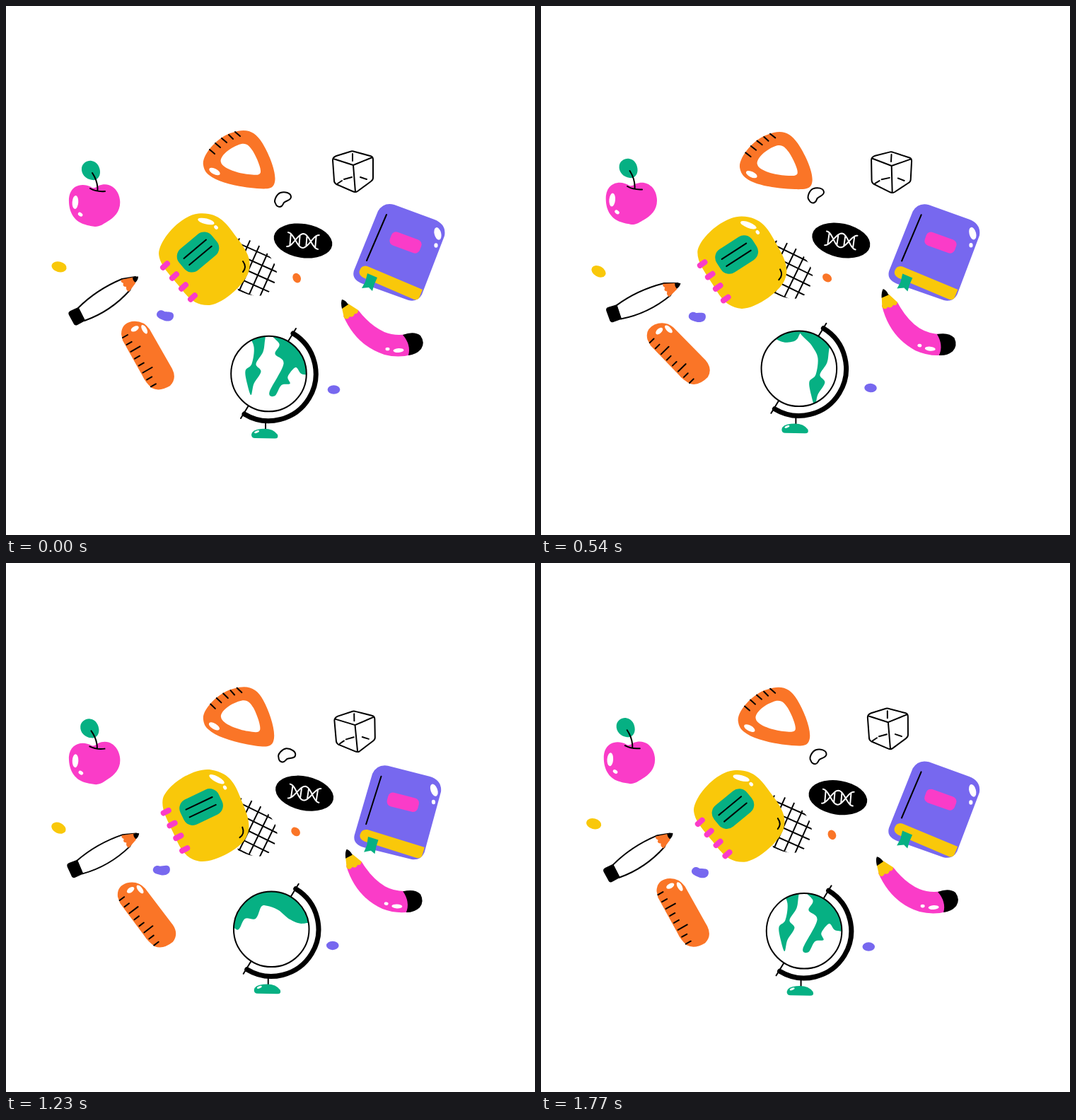
These frames come from a looping animation (748x748 px, 1800 ms). An HTML page:

```html
<!DOCTYPE html>
<html lang="en">
<head>
<meta charset="utf-8">
<title>School things</title>
<style>
  html, body { margin: 0; width: 100%; height: 100%; overflow: hidden; background: #fff; }
  svg { display: block; width: 100%; height: 100%; }
  .pink { fill: #fa3cc8; }
  .green { fill: #06b083; }
  .orange { fill: #fa7527; }
  .yellow { fill: #f9c80a; }
  .purple { fill: #7768ef; }
  .white { fill: #fff; }
  .line { fill: none; stroke: #000; stroke-width: 2; stroke-linecap: round; stroke-linejoin: round; }
</style>
</head>
<body>
<!-- data-sway: size@phase of the swing in x, y and turn; data-pivot: centre of the turn -->
<svg viewBox="0 0 748 748">
  <defs>
    <clipPath id="ball"><circle cx="371.5" cy="520" r="53"/></clipPath>
    <clipPath id="patch"><path d="M318 328L340 329Q362 338 373 354Q386 370 382 384Q378 402 366 409Q346 412 328 402Z"/></clipPath>
  </defs>

  <g data-pivot="125,282" data-sway="1.7@128 2.3@-75 1.8@76">
    <path class="green" d="M122 246C113 245 106 238 107 229C108 222 115 218 121 219C129 220 133 228 133 235C133 242 128 247 122 246Z"/>
    <path class="pink" d="M122 257C110 249 91 252 89 272C88 292 97 305 112 309C118 311 121 311 126 312C133 312 138 308 143 305C154 299 163 289 161 274C159 258 146 248 131 254C128 256 125 258 122 257Z"/>
    <path class="line" d="M119 258Q128 263 140 262M122 236Q130 248 129.5 261"/>
    <ellipse class="white" cx="98" cy="277.5" rx="4.3" ry="9.5" transform="rotate(4 98 277)"/>
    <ellipse class="white" cx="105.5" cy="294.5" rx="3.6" ry="2.5" transform="rotate(35 105 294)"/>
  </g>

  <g data-pivot="330,217" data-sway="1.2@133 1.9@104 3.3@-95">
    <path class="orange" d="M279 225C276 211 300 184 320 179C340 172 352 177 362 193C372 209 383 236 380 249C378 259 370 259 355 258C330 256 300 250 287 239C282 235 280 231 279 225Z"/>
    <path class="white" d="M304 221C301 213 317 199 333 195C341 194 344 198 349 205C355 215 361 230 360 235C359 240 352 239 343 238C330 237 306 230 304 221Z"/>
    <path class="line" d="M288 203L295 209M296 194L303 200M305 187L312 193M315 182L321 188M324 178L331 184"/>
    <ellipse class="white" cx="295" cy="234" rx="8.5" ry="4" transform="rotate(28 295 234)"/>
  </g>

  <g data-pivot="491,234" data-sway="2.7@159 2.5@-140 2.3@108">
    <path class="line" d="M467 212L488 205.5Q490 205 493 206L515 212Q519 213 519 217L519 243Q519 246 516 248L497 262Q494 264 490 262L467 252Q464 250 464 247L462 218Q462 214 467 212ZM463 216L491 225L518 214M491 225L494 263M490 209V219M469 251L475 247M478 245L489 242M501 242L510 245"/>
  </g>

  <g data-pivot="391.5,274" data-sway="4.4@-104 3.7@-47 12@-112">
    <path class="line" d="M381 279C378 275 383 266 388 264C394 262 403 264 403 270C403 275 396 275 393 278C391 281 391 284 387 284C384 284 382 282 381 279Z"/>
  </g>

  <g data-pivot="420,332" data-sway="2.7@150 3.9@49 2.4@180">
    <ellipse cx="420" cy="332" rx="41.7" ry="24" transform="rotate(9 420 332)"/>
    <path id="helix" fill="none" stroke="#fff" stroke-width="2" stroke-linecap="round" transform="translate(420 332) rotate(5)"/>
  </g>

  <g data-pivot="555,349" data-sway="1.4@55 3@-128 3.6@50">
    <path class="purple" d="M526 290Q534 277 549 281L606 302Q623 309 620 325L588 408Q582 419 569 416L505 393Q488 387 492 374Z"/>
    <path class="yellow" d="M511 368L589 401L584 413Q582 416 577 415L505 384Q498 380 500 374Q503 366 511 368Z"/>
    <path class="green" d="M511 378L525 384L521 393L518 403L513 398L503 399L508 390Z"/>
    <rect class="pink" x="542.5" y="324.5" width="45" height="20" rx="7" transform="rotate(20 565 334.5)"/>
    <path class="line" d="M538 295L510 360"/>
    <ellipse class="white" cx="610.5" cy="322" rx="4.8" ry="9" transform="rotate(-14 610 322)"/>
    <ellipse class="white" cx="608" cy="338.5" rx="2.6" ry="3.2"/>
  </g>

  <g data-pivot="350,370" data-sway="1@160 3.2@-175 1.5@180">
    <g clip-path="url(#patch)"><path id="grid" class="line" transform="translate(352 370) rotate(24)"/></g>
  </g>

  <g data-pivot="280.5,358" data-sway="2.4@149 3.3@112 8.8@-156">
    <path class="yellow" d="M216 350C217 330 247 296 272 293.5C300 291 311 306 326 327C340 345 347 358 344 372C342 390 308 421 288 423C265 424 255 409 243 394C228 376 217 365 216 350Z"/>
    <g transform="translate(271.5 348) rotate(-40)">
      <rect class="green" x="-30" y="-19.5" width="60" height="39" rx="14"/>
      <path class="line" d="M-21 -6H20M-21 6H20"/>
    </g>
    <g id="rings" class="pink"></g>
    <ellipse class="white" cx="283" cy="304.5" rx="12" ry="4" transform="rotate(14 283 304)"/>
    <ellipse class="white" cx="297" cy="313" rx="3.2" ry="2.4" transform="rotate(45 297 313)"/>
    <path class="line" d="M335 361Q341 369 335 376"/>
  </g>

  <g data-pivot="75,369" data-sway="4.4@118 4.6@173 10@165">
    <ellipse class="yellow" cx="75" cy="368.8" rx="10.8" ry="7.4" transform="rotate(14 75 369)"/>
  </g>
  <g data-pivot="225.5,438" data-sway="3.4@6 3@76 7@20">
    <path class="purple" d="M213 436C214 430 220 429 224 432C229 433 238 431 237 439C236 446 228 447 222 444C217 442 213 440 213 436Z"/>
  </g>
  <g data-pivot="411,385" data-sway="4@-45 2.9@51 18@-17">
    <ellipse class="orange" cx="411.3" cy="384.7" rx="5.6" ry="7" transform="rotate(-25 411 385)"/>
  </g>
  <g data-pivot="463.5,542.5" data-sway="2.3@97 1.6@-22 2@120">
    <ellipse class="purple" cx="463.5" cy="542.5" rx="8.8" ry="6.2"/>
  </g>

  <g data-pivot="137.5,417" data-sway="4.1@115 3@75 5.3@149">
    <path class="line" style="fill:#fff" d="M102 427Q128 401 164 386L183 383L175 402Q148 432 111 445Z"/>
    <path class="orange" d="M163 387L182 383L183 392L174 404Q169 402 170 397Q164 397 166 392Q161 390 163 387Z"/>
    <path d="M179 383.5Q184 382 187 382.5Q187 387 183 391Q179 388 179 383.5Z"/>
    <path d="M89 437Q87 433 91 431L102 426L112 445L101 451Q97 453 95 448Z"/>
  </g>

  <g data-pivot="200.5,494.5" data-sway="3.7@-45 3.2@-94 9.2@-28">
    <path class="orange" d="M163 464Q163 449 178 446Q194 444 203 457L235 513Q242 527 232 537Q217 546 206 540Q197 532 193 523L165 473Z"/>
    <path id="ticks" class="line"/>
    <ellipse class="white" cx="182" cy="456.5" rx="6" ry="3.4" transform="rotate(-28 182 456)"/>
    <ellipse class="white" cx="195.5" cy="457.5" rx="3.2" ry="7" transform="rotate(-30 195 457)"/>
  </g>

  <g data-pivot="568,480" data-sway="2.3@-35 0@0 6.4@161">
    <path class="pink" d="M477 438L498 430Q515 452 535 461Q550 467 567 464L573 493Q555 498 535 493Q495 480 477 438Z"/>
    <path class="yellow" d="M475 427L484 421L498 430Q498 436 493 435Q491 441 486 439Q483 445 478 441Z"/>
    <path d="M475 415Q480 416 484 422L475 428Q473 419 475 415Z"/>
    <path d="M561 465Q577 459 586 466Q593 476 587 485Q580 493 569 494Q573 479 561 465Z"/>
    <ellipse class="white" cx="555" cy="487" rx="7.5" ry="3" transform="rotate(-4 555 487)"/>
    <ellipse class="white" cx="539.5" cy="485" rx="3" ry="2.3"/>
  </g>

  <g data-pivot="371.5,520" data-sway="5.7@-80 4.5@-40 0@0">
    <path class="line" d="M410 456L399 474M332 583L343 565M367 587V600"/>
    <circle class="white" cx="371.5" cy="520" r="53"/>
    <g clip-path="url(#ball)"><path id="land" class="green" transform="translate(371.5 520)"/></g>
    <circle class="line" cx="371.5" cy="520" r="53.3"/>
    <path class="line" style="stroke-width:7" d="M406 463A66 66 0 1 1 337 577"/>
    <path class="green" d="M347 606Q348 599 360 598Q377 596 384 606Q386 611.5 380 611.5L352 611Q347 611 347 606Z"/>
    <ellipse class="white" cx="354.5" cy="602.3" rx="3.6" ry="1.5" transform="rotate(-22 354 602)"/>
  </g>
</svg>
<script>
const LOOP = 1800, STEP = 30;
const DRIFT = [.088, .042]; // px per ms of the land across the globe
const $ = id => document.getElementById(id);
const range = n => [...Array(n).keys()];
const points = text => text.split(' ').map(p => p.split(',').map(Number));

// Repeated parts
const wave = x => 10 * Math.cos((x + 22) * Math.PI / 22);
const strand = side => 'M' + range(23).map(i => `${i * 2 - 22} ${side * wave(i * 2 - 22)}`).join('L');
const rungs = [-18, -5, 5, 18].map(x => `M${x} ${-wave(x)}V${wave(x)}`).join('');
$('helix').setAttribute('d', strand(1) + strand(-1) + rungs);

$('grid').setAttribute('d', range(7).map(i => {
  const p = (i - 3) * 15 + 8;
  return `M-60 ${p}H60M${p} -60V60`;
}).join(''));

$('ticks').setAttribute('d', range(8).map(i => {
  const len = i % 3 == 2 ? 15 : 8;
  return `M${165 + i * 5.7} ${469 + i * 9.9}l${len * .87} ${-len * .5}`;
}).join(''));

$('rings').innerHTML = range(4).map(i =>
  `<rect x="-8" y="-4" width="16" height="8" rx="4" transform="translate(${225 + i * 13} ${367 + i * 15}) rotate(-42)"/>`
).join('');

// Swinging parts: each value is a cosine that passes through 0 at the loop start
const parts = [...document.querySelectorAll('[data-sway]')].map(el => ({
  el,
  pivot: el.dataset.pivot,
  waves: el.dataset.sway.split(' ').map(w => w.split('@').map(Number))
}));

function swing([size, phase], t) {
  const shift = phase * Math.PI / 180;
  return size * (Math.cos(t / LOOP * 2 * Math.PI - shift) - Math.cos(shift));
}

// Coastlines around the globe's centre; the eastern one opens up as it comes into view
const west = points('-45,-76 -30,-56 -21,-38 -24,-14 -33,-4 -30,16 -25,30 -21,14 -11,-3 -18,-14 -8,-31 -5,-50 0,-80');
const eastFar = points('-6,-40 -10,-20 -12,-5 -8,15 0,24 5,23 13,9 28,9 36,-8 44,-9 60,-3 76,10 94,16 110,8 108,-25');
const eastNear = points('2,-62 15,-42 9,-28 21,-14 1,26 9,31 18,16 30,14 27,4 38,-9 46,0 60,3 94,16 110,8 108,-25');

function east(t) {
  const k = Math.min(1, Math.max(0, (t - 1230) / 360)), u = k * k * (3 - 2 * k);
  return eastFar.map((p, i) => p.map((v, axis) => v + (eastNear[i][axis] - v) * u));
}

function closedCurve(p) {
  const n = p.length, at = i => p[(i + n) % n];
  const bend = (a, b, c) => a.map((v, k) => v + (b[k] - c[k]) / 6);
  return 'M' + p[0] + p.map((a, i) => {
    const b = at(i + 1);
    return `C${bend(a, b, at(i - 1))} ${bend(b, a, at(i + 2))} ${b}`;
  }).join('') + 'Z';
}

function land(t) {
  const move = shape => shape.map(p => p.map((v, axis) => v + DRIFT[axis] * (t - LOOP)));
  return closedCurve(move(west)) + closedCurve(move(east(t)));
}

function draw(t) {
  for (const { el, pivot, waves } of parts) {
    const [x, y, turn] = waves.map(w => swing(w, t));
    el.setAttribute('transform', `translate(${x} ${y}) rotate(${turn} ${pivot})`);
  }
  $('land').setAttribute('d', land(t) + land(t + LOOP));
}

const start = performance.now();
function tick() {
  const t = (performance.now() - start) % LOOP;
  draw(Math.floor(t / STEP) * STEP);
  requestAnimationFrame(tick);
}
tick();
</script>
</body>
</html>
```
